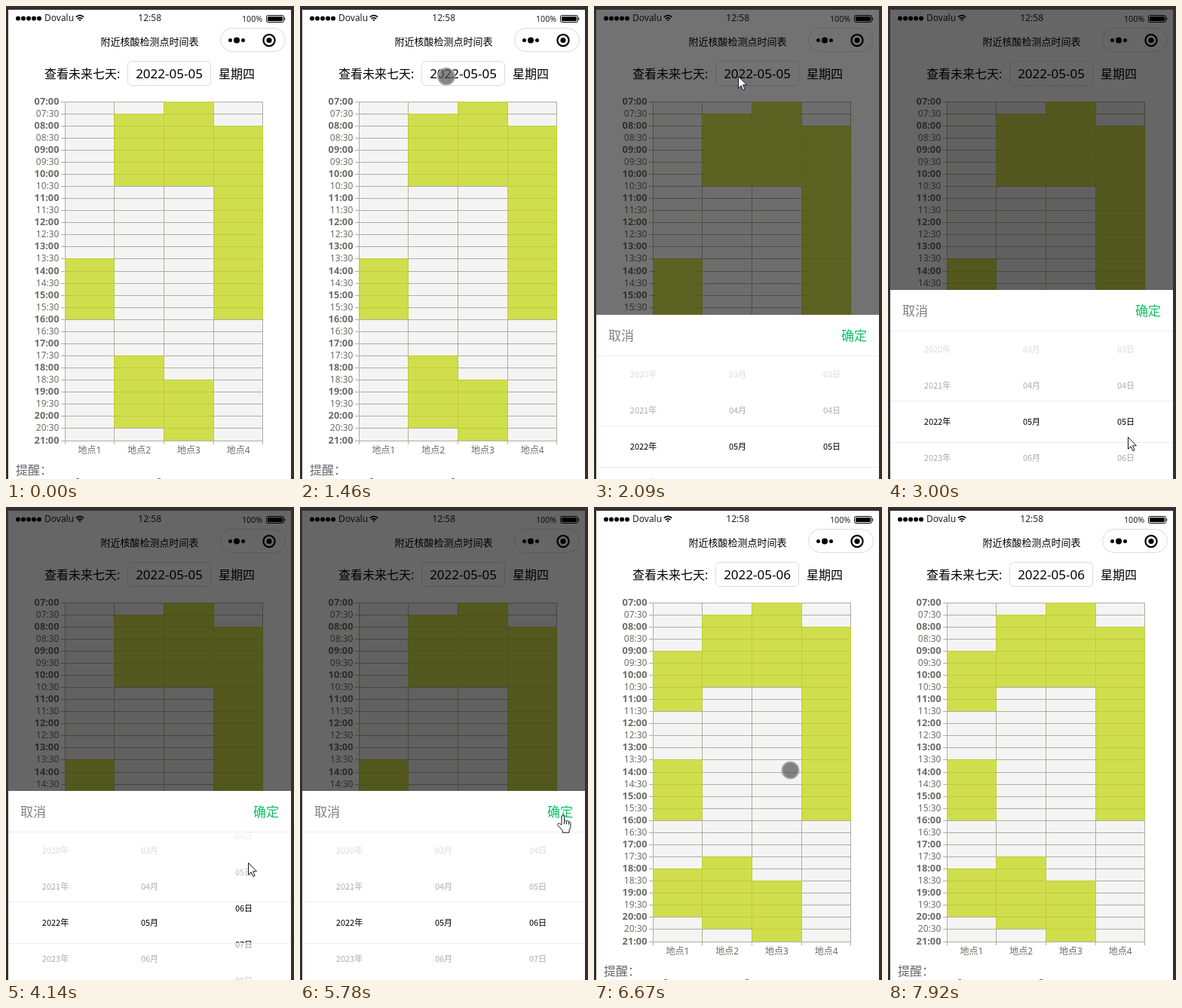
Recreate the animation shown at these times as an HTML page. Size 382 by 628 pixels, loop 8 s.

```html
<!DOCTYPE html>
<html lang="zh-CN">
<head>
<meta charset="utf-8">
<title>时间表</title>
<style>
html, body { margin: 0; width: 100%; height: 100%; overflow: hidden; background: #343031; }
svg { display: block; width: 382px; height: 628px; }
text { font-family: "Noto Sans", "Noto Sans CJK SC", "Noto Sans CJK", sans-serif; }
.mid { text-anchor: middle; }
.status { font-size: 12px; fill: #222; }
.body { font-size: 16px; }
.axis text { font-size: 12px; fill: #6c6c68; }
.axis .hour { font-size: 12.8px; font-weight: 700; }
.lines { stroke: #aeae9f; fill: none; }
.bars { fill: rgb(195,215,20); fill-opacity: .75; }
.wheel text { font: 11px "Noto Sans CJK SC", "Noto Sans CJK", sans-serif; text-anchor: middle; }
.pointer { fill: #fff; stroke: #15152a; stroke-linejoin: round; }
</style>
</head>
<body>
<svg viewBox="0 0 382 628">
  <defs>
    <linearGradient id="fadeTop" x2="0" y2="1">
      <stop stop-color="#fff" stop-opacity=".95"/><stop offset="1" stop-color="#fff" stop-opacity=".6"/>
    </linearGradient>
    <linearGradient id="fadeEnd" x2="0" y2="1">
      <stop stop-color="#fff" stop-opacity=".6"/><stop offset="1" stop-color="#fff" stop-opacity=".95"/>
    </linearGradient>
    <clipPath id="wheelBox"><rect x="3" y="432" width="375" height="240"/></clipPath>
    <clipPath id="screen"><rect x="3" y="5" width="375" height="623"/></clipPath>
  </defs>
  <rect width="382" height="628" fill="#343031"/>
  <g clip-path="url(#screen)">
    <rect x="3" y="5" width="375" height="623" fill="#fff"/>

    <g id="dots"></g>
    <text class="status" x="51" y="20">Dovalu</text>
    <g fill="none" stroke="#000" stroke-width="1.7">
      <path d="M92.8 14.6Q98 10 103.2 14.6M94.8 17Q98 14.2 101.2 17"/>
      <path d="M96.4 18.3Q98 17 99.6 18.3L98 20.2Z" fill="#000" stroke="none"/>
    </g>
    <text class="status mid" x="190.7" y="20">12:58</text>
    <text class="status" x="313" y="20.5" style="font-size:10.7px">100%</text>
    <rect x="345.5" y="12.5" width="23" height="9" rx="2" fill="none" stroke="#000"/>
    <rect x="347" y="14" width="20" height="6" rx="1"/>
    <path d="M369.5 15q2 2 0 4z"/>

    <text class="mid" x="190.5" y="52" font-size="13">附近核酸检测点时间表</text>
    <rect x="284.5" y="29.5" width="86" height="31" rx="15.5" fill="#fff" stroke="#dcdcdc"/>
    <circle cx="297.5" cy="45.5" r="2.5"/><circle cx="306" cy="45.5" r="4"/><circle cx="314.5" cy="45.5" r="2.5"/>
    <circle cx="349" cy="45.5" r="7.6" fill="none" stroke="#000" stroke-width="2.2"/>
    <circle cx="349" cy="45.5" r="3.6"/>

    <text class="body" x="51" y="96">查看未来七天:</text>
    <rect x="161.5" y="73.5" width="110" height="32" rx="5" fill="#fff" stroke="#dcdcdc"/>
    <text id="date" class="mid" x="216.5" y="96" font-size="17"></text>
    <text class="body" x="282" y="96">星期四</text>

    <rect x="78" y="127" width="263" height="450" fill="#f4f4f4"/>
    <path id="grid" class="lines"/>
    <g id="axis" class="axis"></g>
    <path id="bars" class="bars"/>
    <text class="body" x="13" y="622" fill="#68686c">提醒：</text>
    <path d="M93 627h4v1h-4zM201 627h4v1h-4z" fill="#777"/>

    <rect id="shade" x="3" y="5" width="375" height="623" opacity="0"/>
    <g id="sheet">
      <rect x="3" y="377" width="375" height="295" fill="#fff"/>
      <text x="19" y="411" font-size="17" fill="#808080">取消</text>
      <text x="328" y="411" font-size="17" fill="#07c160">确定</text>
      <g class="wheel" clip-path="url(#wheelBox)">
        <g id="years"></g><g id="months"></g><g id="days"></g>
        <rect x="3" y="432" width="375" height="92" fill="url(#fadeTop)"/>
        <rect x="3" y="580" width="375" height="92" fill="url(#fadeEnd)"/>
      </g>
      <path d="M3 431.5h375M3 524.5h375M3 579.5h375" stroke="#ededed"/>
    </g>

    <g id="cursor">
      <circle id="ring" r="11" fill="rgba(85,85,85,.72)" stroke="rgba(165,165,165,.85)" stroke-width="2"/>
      <path id="arrow" class="pointer" d="M.5.5V16.3L4.2 12.8 6.8 18.6 9.1 17.6 6.6 11.8H11.4Z"/>
      <g id="hand" class="pointer" transform="translate(-7 0)">
        <path d="M6 13V2.4a1.8 1.8 0 0 1 3.6 0V8.2a1.6 1.6 0 0 1 3 .5 1.5 1.5 0 0 1 2.9.8 1.4 1.4 0 0 1 2.4 1.1V16.4L16 20.2V23.3H7.4V20.8L1 13.6a1.6 1.6 0 0 1 2.5-2.1Z"/>
        <path d="M9.6 8.2V12M12.6 9V12.3M15.5 10V12.6" fill="none"/>
      </g>
    </g>
  </g>
</svg>
<script>
const LOOP = 8000;
const $ = id => document.getElementById(id);

function add(parent, tag, attrs, text) {
  const el = document.createElementNS('http://www.w3.org/2000/svg', tag);
  for (const k in attrs) el.setAttribute(k, attrs[k]);
  if (text) el.textContent = text;
  parent.appendChild(el);
}
const pad = n => String(n).padStart(2, '0');
const rowY = i => Math.floor(127 + i * 450 / 28);
const colX = i => Math.floor(78 + i * 65.7);

// Chart
for (let i = 0; i < 5; i++) add($('dots'), 'circle', { cx: 16 + 7 * i, cy: 16.5, r: 3 });
let lines = '';
for (let i = 0; i <= 28; i++) {
  const y = rowY(i), whole = i % 2 === 0;
  lines += `M73 ${y + .5}H341`;
  add($('axis'), 'text', { x: 70.5, y: y + 3.5, 'text-anchor': 'end', class: whole ? 'hour' : '' },
    pad(7 + (i >> 1)) + (whole ? ':00' : ':30'));
}
for (let i = 0; i < 5; i++) {
  lines += `M${colX(i) + .5} 127V582`;
  if (i < 4) add($('axis'), 'text', { x: 111 + 65.7 * i, y: 594, class: 'mid' }, '地点' + (i + 1));
}
$('grid').setAttribute('d', lines);

// Bars: column, first half hour, last half hour
const barPath = list => list.map(([c, a, b]) =>
  `M${colX(c)} ${rowY(a)}H${colX(c + 1) + 1}V${rowY(b)}H${colX(c)}Z`).join('');
const shared = [[0, 13, 18], [1, 1, 7], [1, 21, 27], [2, 0, 7], [2, 23, 28], [3, 2, 18]];
const oldBars = barPath(shared);
const newBars = barPath([...shared, [0, 4, 9], [0, 22, 26]]);

// Picker wheels, centred on y = 552
function wheel(id, x, mid, unit) {
  for (let i = -3; i <= 4; i++)
    add($(id), 'text', { x, y: 556 + 48 * i }, pad(mid + i) + unit);
}
wheel('years', 65.5, 2022, '年');
wheel('months', 190.5, 5, '月');
wheel('days', 315.5, 5, '日');

// The picture only changes at these moments: first, last, count
const ticks = [0];
for (const [a, b, n] of [
  [120, 600, 5], [1220, 1580, 4], [1850, 2210, 4], [2460, 2700, 3], [2850, 2850, 1],
  [3000, 3120, 2], [3270, 3270, 1], [3520, 3640, 2], [3780, 4510, 7], [4630, 4990, 4],
  [5130, 5130, 1], [5270, 5390, 2], [5540, 5780, 3], [6070, 6670, 6], [7560, 7920, 4]
]) for (let i = 0; i < n; i++)
  ticks.push(n > 1 ? Math.floor((a + (b - a) * i / (n - 1)) / 10) * 10 : a);

const path = [
  [120, 182, 157], [600, 194, 93], [1220, 194, 94], [1340, 196, 94], [1580, 192, 93],
  [1850, 191, 93], [2340, 191, 93], [2700, 276, 572], [2850, 312, 608], [3000, 318, 572],
  [3120, 321, 552], [3270, 321, 545], [3640, 321, 537], [4140, 321, 472], [4510, 319, 470],
  [4990, 319, 470], [5130, 327, 462], [5390, 347, 446], [5540, 349, 430], [5780, 348, 409],
  [6190, 348, 409], [6670, 260.5, 349.5], [7440, 260.5, 349.5], [7680, 282, 440], [7800, 303, 600]
];
const scroll = [[3270, 0], [3640, 8], [4140, 67], [4270, 68], [4510, 68], [4990, 54], [5130, 51], [5390, 48]];
const lift = [[1730, 0], [1850, .04], [1970, .375], [2090, .87], [2210, 1], [5780, 1], [6070, .95], [6190, .5], [6310, .1], [6430, 0]];
const dim = [[1730, 0], [1850, .15], [1970, .58], [2090, .92], [2210, 1], [5780, 1], [6070, .9], [6190, .4], [6310, .08], [6430, 0]];

function at(keys, t, k = 1) {
  let i = keys.findIndex(key => key[0] > t);
  if (i === 0) return keys[0][k];
  if (i < 0) return keys[keys.length - 1][k];
  const a = keys[i - 1], b = keys[i];
  return a[k] + (b[k] - a[k]) * (t - a[0]) / (b[0] - a[0]);
}

function pointerAt(t) {
  if (t < 120 || t >= 7920) return '';
  if (t < 1850 || t >= 6310) return 'ring';
  return t < 5540 ? 'arrow' : 'hand';
}

const move = (id, x, y) => $(id).setAttribute('transform', `translate(${x} ${y})`);

function draw(t) {
  const changed = t >= 6190, kind = pointerAt(t);
  $('date').textContent = changed ? '2022-05-06' : '2022-05-05';
  $('bars').setAttribute('d', changed ? newBars : oldBars);
  $('shade').setAttribute('opacity', .6 * at(dim, t));
  move('sheet', 0, Math.round(251 * (1 - at(lift, t))));
  $('sheet').style.display = at(lift, t) > 0 ? '' : 'none';
  move('days', 0, -Math.round(at(scroll, t)));
  const snap = kind === 'ring' ? v => v : Math.round;
  move('cursor', snap(at(path, t, 1)), snap(at(path, t, 2)));
  for (const id of ['ring', 'arrow', 'hand']) $(id).style.display = id === kind ? '' : 'none';
}

const start = performance.now();
let last = -1;
function frame() {
  const now = (performance.now() - start) % LOOP;
  const t = ticks.reduce((best, tick) => tick <= now ? tick : best, 0);
  if (t !== last) draw(last = t);
  requestAnimationFrame(frame);
}
frame();
</script>
</body>
</html>
```
